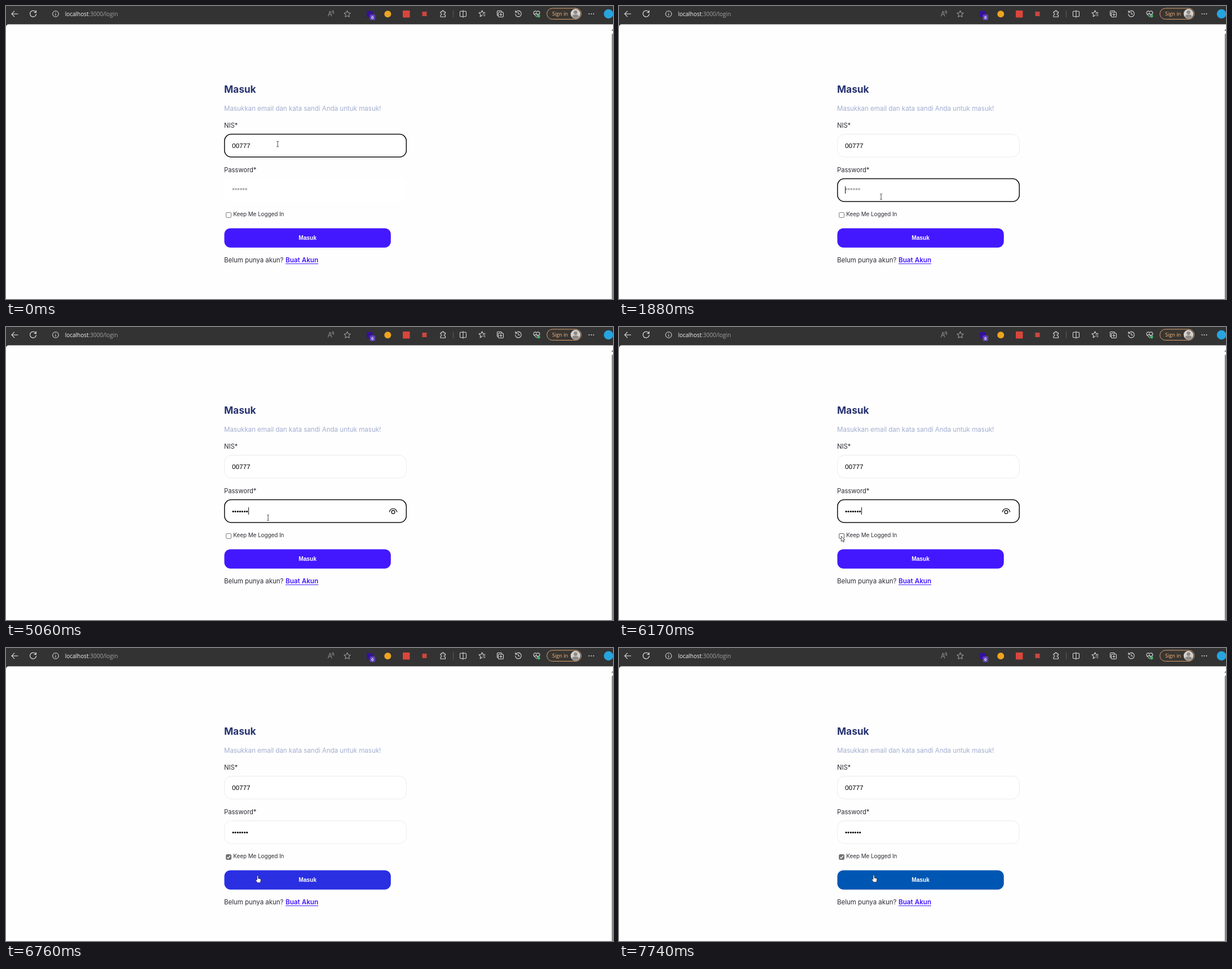
An HTML page that plays this animation: 1077x520 px, repeating every 8000 ms.

```html
<!DOCTYPE html>
<html lang="id">
<head>
<meta charset="utf-8">
<style>
  html, body { margin: 0; width: 100%; height: 100%; overflow: hidden; background: #fefefe; }
  svg { display: block; width: 100%; height: 100%; }
  text { font-family: Inter, "Open Sans", sans-serif; font-feature-settings: "calt" 0; white-space: pre; }
  .chrome { font-family: "Open Sans", "Noto Sans", sans-serif; }
  .field { font: 11.7px "Liberation Sans", Arial, sans-serif; }
  .label { font-size: 11.2px; fill: #2c2c34; }
  .icon { fill: none; stroke: #dedede; stroke-width: 1.05; stroke-linecap: round; stroke-linejoin: round; }
</style>
</head>
<body>
<svg viewBox="0 0 1077 520" xmlns="http://www.w3.org/2000/svg">
  <rect width="1077" height="520" fill="#fefefe"/>

  <!-- Browser bar -->
  <path d="M0 0H1077V32.5H5Q0 32.5 0 38Z" fill="#333"/>
  <g class="icon">
    <path d="M21 14H10M14.8 9.2L10 14l4.8 4.8" stroke="#f2f2f2"/>
    <path d="M53 11.2A5.5 5.5 0 1 0 53.6 14M53.4 8v3.4H50" stroke="#f2f2f2"/>
    <circle cx="88" cy="14" r="5.3"/>
    <path d="M88 13.4v3.2M88 11.1v.2"/>
    <path d="M571.5 18l3.2-9 3.2 9M572.6 15h4.2M578 9q1.5 1.5 1 3.6M579.8 8q2.4 2.3 1.5 5.6" stroke="#8c8c8c"/>
    <path d="M605.5 8.3l1.75 3.6 3.95.55-2.85 2.8.65 3.95-3.5-1.85-3.5 1.85.65-3.95-2.85-2.8 3.95-.55Z" stroke="#a0a0a0"/>
    <path d="M771 10.3h2.7q-.5-2.2 1.5-2.2t1.5 2.2h2.8v2.6q-2.3-.3-2.3 1.5t2.3 1.5v3.3h-8.5v-3.2q2 .2 2-1.6t-2-1.6Z"/>
    <path d="M793.5 8v12" stroke="#5c5c5c"/>
    <path d="M810 9.2h-3q-1.5 0-1.5 1.5v6.6q0 1.5 1.5 1.5h3M812 9.2h3q1.5 0 1.5 1.5v6.6q0 1.5-1.5 1.5h-3M811 7.8v12.4"/>
    <path d="M845 16.5l-3.8 2.3.8-4-3-2.9 4-.5 1.7-3.5 1.6 3.5h3.7M846 14h4M847.5 17h2.5"/>
    <path d="M873.5 17.3q-2 0-2-2v-5.1q0-1.7 1.7-1.7h4.6q1.9 0 1.9 1.9M875 11h6q1.500 0 1.500 1.500v5.500q0 1.500-1.500 1.500h-6q-1.500 0-1.500-1.500v-5.500q0-1.500 1.500-1.500M878 13v4.400M875.800 15.200h4.400"/>
    <path d="M904.300 11.200a5.300 5.300 0 1 1-.6 2.800M904 8.300v3h3M909 11v3.300h2.600"/>
    <path d="M941.5 19l-4.500-4.500q-2-3 .2-4.900 2.400-1.700 4.300.6 2-2.300 4.400-.6 2 1.800.5 4.600M936.500 14.200h3l1.300-2.200 1.700 4 1.100-1.800h2"/>
  </g>
  <circle cx="945" cy="17.700" r="2.700" fill="#46b36a"/>
  <text class="chrome" x="104.700" y="17.700" font-size="10" fill="#f4f4f4">localhost<tspan fill="#a2a2a2">:3000/login</tspan></text>

  <!-- Extension buttons -->
  <rect x="640" y="9" width="10.500" height="10.500" fill="#35109c"/>
  <rect x="645.500" y="15" width="9.500" height="10" rx="2" fill="#6244bb"/>
  <text class="chrome" x="650.200" y="23" font-size="7.500" font-weight="600" text-anchor="middle" fill="#fff">6</text>
  <circle cx="677.300" cy="14.200" r="6" fill="#eda51f"/>
  <rect x="704" y="8" width="12.500" height="12.500" rx="1" fill="#d9463b"/>
  <rect x="738.500" y="10" width="8" height="8" fill="#c9473f"/>

  <rect x="959.700" y="4" width="61" height="19.500" rx="9.750" fill="#393531" stroke="#d9a06c"/>
  <text class="chrome" x="969" y="17.200" font-size="9.100" fill="#f3b880">Sign in</text>
  <circle cx="1010.500" cy="13.800" r="8.700" fill="#d4d1ce"/>
  <circle cx="1010.500" cy="11" r="3.300" fill="#8d8a88"/>
  <path d="M1004.500 19q0-4 6-4t6 4q-2.500 2.800-6 2.800t-6-2.800" fill="#8d8a88"/>
  <g fill="#dedede"><circle cx="1034.500" cy="14" r="1"/><circle cx="1038.500" cy="14" r="1"/><circle cx="1042.500" cy="14" r="1"/></g>
  <circle cx="1069" cy="14" r="8.300" fill="#27a4df"/>
  <path d="M1074 44l3.500-4v4Z" fill="#777"/>
  <rect x="1074.800" y="49" width="5" height="480" rx="1.500" fill="#858585"/>

  <!-- Login form -->
  <text x="387" y="154" font-size="17.300" font-weight="700" fill="#27336f">Masuk</text>
  <text x="387" y="186.200" font-size="11.550" fill="#a3aed0">Masukkan email dan kata sandi Anda untuk masuk!</text>
  <text class="label" x="387" y="216.300">NIS*</text>
  <rect id="nisBox" x="387.700" y="227.600" width="322.600" height="40.400" rx="12" fill="#fff"/>
  <text class="field" x="401" y="252">00777</text>
  <text class="label" x="387" y="295.300">Password*</text>
  <rect id="passBox" x="387.700" y="306.600" width="322.600" height="40.400" rx="12" fill="#fff"/>
  <text id="pass" class="field" x="401" y="331"/>
  <g id="eye" fill="none" stroke="#111" stroke-width="1.300" stroke-linecap="round">
    <path d="M680.300 328q1.600-5.600 6.700-5.600t6.700 5.600"/>
    <circle cx="687" cy="328.400" r="2.900"/>
  </g>
  <rect id="caret" width="1" height="13" fill="#111"/>

  <rect id="box" x="390.600" y="366.600" width="8.800" height="8.800" rx="1.600" stroke-width="1"/>
  <path id="tick" d="M392.400 371.200l1.900 1.900 3.500-4.300" fill="none" stroke="#fff" stroke-width="1.400"/>
  <text x="403.300" y="372.700" font-size="9.800" fill="#2c2c34">Keep Me Logged In</text>
  <rect id="button" x="387.400" y="394.400" width="295.400" height="34.300" rx="11"/>
  <text x="535" y="414.500" text-anchor="middle" fill="#fff" style="font:bold 10.2px 'Liberation Sans',Arial,sans-serif">Masuk</text>
  <text x="387" y="455.200" font-size="11.450" fill="#2c2c34">Belum punya akun?</text>
  <text x="496" y="455.200" font-size="11.700" font-weight="600" fill="#4318ff">Buat Akun</text>
  <path d="M496 457.500h58" stroke="#4318ff"/>

  <!-- Pointers, each drawn around its hot spot -->
  <path id="beam" d="M-2 -4.800h1.500l.5 .5 .5 -.5h1.500M0 -4.300v8.600M-2 4.800h1.500l.5 -.5 .5 .5h1.500" fill="none" stroke="#333" stroke-width=".9"/>
  <path id="arrow" d="M.3 .3v9.300l2.200-2 1.500 3.200 1.500-.7-1.500-3.100h2.900Z" fill="#fff" stroke="#222" stroke-width=".8"/>
  <path id="hand" d="M-1.100 1.200q0-1.200 1.100-1.200t1.100 1.200v3.800l3.500 .8q1.200.4 1.200 1.700l-.9 4.900h-5.500l-2.700-4.200q-.4-1.100.6-1.300l1.600 1Z" fill="#fff" stroke="#222" stroke-width=".7" stroke-linejoin="round"/>
</svg>
<script>
const LOOP = 8000;
const el = id => document.getElementById(id);
const show = (id, on) => el(id).setAttribute('visibility', on ? 'visible' : 'hidden');
const set = (id, attrs) => Object.entries(attrs).forEach(([k, v]) => el(id).setAttribute(k, v));

// Value of the latest [time, ...values] entry that has begun.
const at = (track, t) => track.findLast(step => step[0] <= t).slice(1);

const pointer = [
  [0, 'beam', 482, 245], [150, 'beam', 487, 263], [270, 'arrow', 486, 282],
  [420, 'beam', 470, 325], [540, 'beam', 465, 338.5], [5750, 'beam', 434, 351],
  [5890, 'beam', 410, 363], [6040, 'arrow', 396, 370], [6170, 'arrow', 394, 371],
  [6450, 'arrow', 397, 375], [6610, 'arrow', 427, 390], [6760, 'hand', 446.5, 404],
  [6880, 'hand', 447.8, 406], [7740, 'hand', 452, 403]
];
const keys = [3160, 3300, 4020, 4290, 4600, 4760, 5060];
const caretFlips = [540, 1320, 1880, 2440, 2870, 3710, 4020, 5460, 6040, 6310];
const focusTrack = [[0, 'nis'], [790, 'pass'], [6310, 'none']];
const boxFill = [[0, '#fff'], [6310, '#858585'], [6450, '#5c5c5c'], [6610, '#707070']];
const boxEdge = [[0, '#767676'], [6040, '#4f4f4f'], ...boxFill.slice(1)];
const buttonFill = [[0, '#4318ff'], [6760, '#2a2fe2'], [6880, '#0056b3']];

function outline(id, focused, edge) {
  set(id, { stroke: focused ? '#0c0c0c' : edge, 'stroke-width': focused ? 1.5 : 0.8 });
}

function draw(t) {
  const [focus] = at(focusTrack, t);
  const typed = keys.filter(k => k <= t).length;
  const flips = caretFlips.filter(k => k <= t).length;

  outline('nisBox', focus === 'nis', '#e6e6ee');
  outline('passBox', focus === 'pass', t < 790 ? 'none' : '#e6e6ee');

  el('pass').textContent = typed ? '•'.repeat(typed) : '******';
  set('pass', { fill: typed ? '#000' : '#757575' });
  show('eye', typed && focus === 'pass');

  set('caret', focus === 'nis' ? { x: 433, y: 241 } : { x: 401 + Math.round(typed * 4.1), y: 320 });
  show('caret', flips % 2 && focus !== 'none');

  set('box', { fill: at(boxFill, t)[0], stroke: at(boxEdge, t)[0] });
  show('tick', t >= 6310);
  set('button', { fill: at(buttonFill, t)[0] });

  const [kind, x, y] = at(pointer, t);
  for (const id of ['beam', 'arrow', 'hand']) show(id, id === kind);
  set(kind, { transform: `translate(${x} ${y})` });
}

const start = performance.now();
function tick() {
  draw((performance.now() - start) % LOOP);
  requestAnimationFrame(tick);
}
tick();
</script>
</body>
</html>
```
